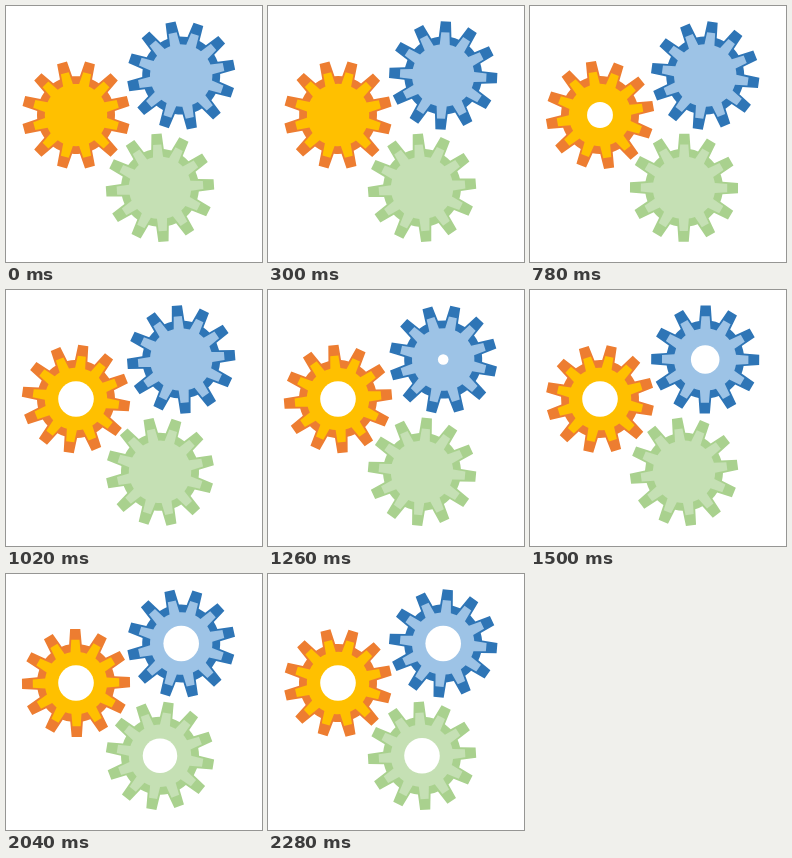
Recreate the animation shown at these times as an HTML page. Size 256 by 256 pixels, loop 2.34 s.

```html
<!DOCTYPE html>
<html lang="en">
<head>
<meta charset="utf-8">
<title>Gears</title>
<style>
  html, body { margin: 0; width: 100%; height: 100%; overflow: hidden; background: #fff; }
  svg { display: block; width: 100vw; height: 100vh; }
</style>
</head>
<body>
<svg id="stage" viewBox="0 0 256 256"></svg>
<script>
const LOOP = 2340, STEP = 60;
const TEETH = 12, TIP = 54, ROOT = 39, TIP_HALF = 5.1, ROOT_HALF = 6.3;
const INNER = 0.8, HOLE = 17.8, GROW = 2.25;

// angle: rest pose in degrees; spin: degrees per step; wait, open: steps before spin and hole start
const gears = [
  { x: 70, y: 109, rim: '#ED7D31', face: '#FFC000', angle: 15, spin: -18.15, wait: 0.07, open: 7.25 },
  { x: 175.2, y: 69.5, rim: '#2E75B6', face: '#9DC3E6', angle: 18.6, spin: -18.12, wait: 0.82, open: 18.65 },
  { x: 154, y: 181.8, rim: '#A9D18E', face: '#C5E0B4', angle: 26.3, spin: -18.15, wait: 0, open: 26.33 }
];

const stage = document.getElementById('stage');

function add(parent, tag, attrs) {
  const el = document.createElementNS('http://www.w3.org/2000/svg', tag);
  for (const key in attrs) el.setAttribute(key, attrs[key]);
  return parent.appendChild(el);
}

function gearPath() {
  const base = Math.sqrt(ROOT ** 2 - ROOT_HALF ** 2);
  const tooth = [[-ROOT_HALF, base], [-TIP_HALF, TIP], [TIP_HALF, TIP], [ROOT_HALF, base]];
  let d = '';
  for (let i = 0; i < TEETH; i++) {
    const a = i * 2 * Math.PI / TEETH, c = Math.cos(a), s = Math.sin(a);
    tooth.forEach(([u, r], k) => {
      const x = u * c + r * s, y = u * s - r * c;
      const cmd = k ? 'L' : i ? `A${ROOT} ${ROOT} 0 0 1 ` : 'M';
      d += `${cmd}${x.toFixed(2)} ${y.toFixed(2)}`;
    });
  }
  return d + 'Z';
}

const shape = gearPath();
for (const g of gears) {
  const group = add(stage, 'g', { transform: `translate(${g.x} ${g.y})` });
  g.wheel = add(group, 'g', {});
  add(g.wheel, 'path', { d: shape, fill: g.rim });
  add(g.wheel, 'path', { d: shape, fill: g.face, transform: `scale(${INNER})` });
  g.hole = add(group, 'circle', { r: 0, fill: '#fff' });
}

function draw(now) {
  const n = Math.floor((now % LOOP) / STEP);
  for (const g of gears) {
    const turn = g.angle + g.spin * Math.max(0, n - g.wait);
    const r = Math.min(HOLE, Math.max(0, (n - g.open) * GROW));
    g.wheel.setAttribute('transform', `rotate(${turn})`);
    g.hole.setAttribute('r', r);
  }
}

let start;
function tick(now) {
  start ??= now;
  draw(now - start);
  requestAnimationFrame(tick);
}
draw(0);
requestAnimationFrame(tick);
</script>
</body>
</html>
```
